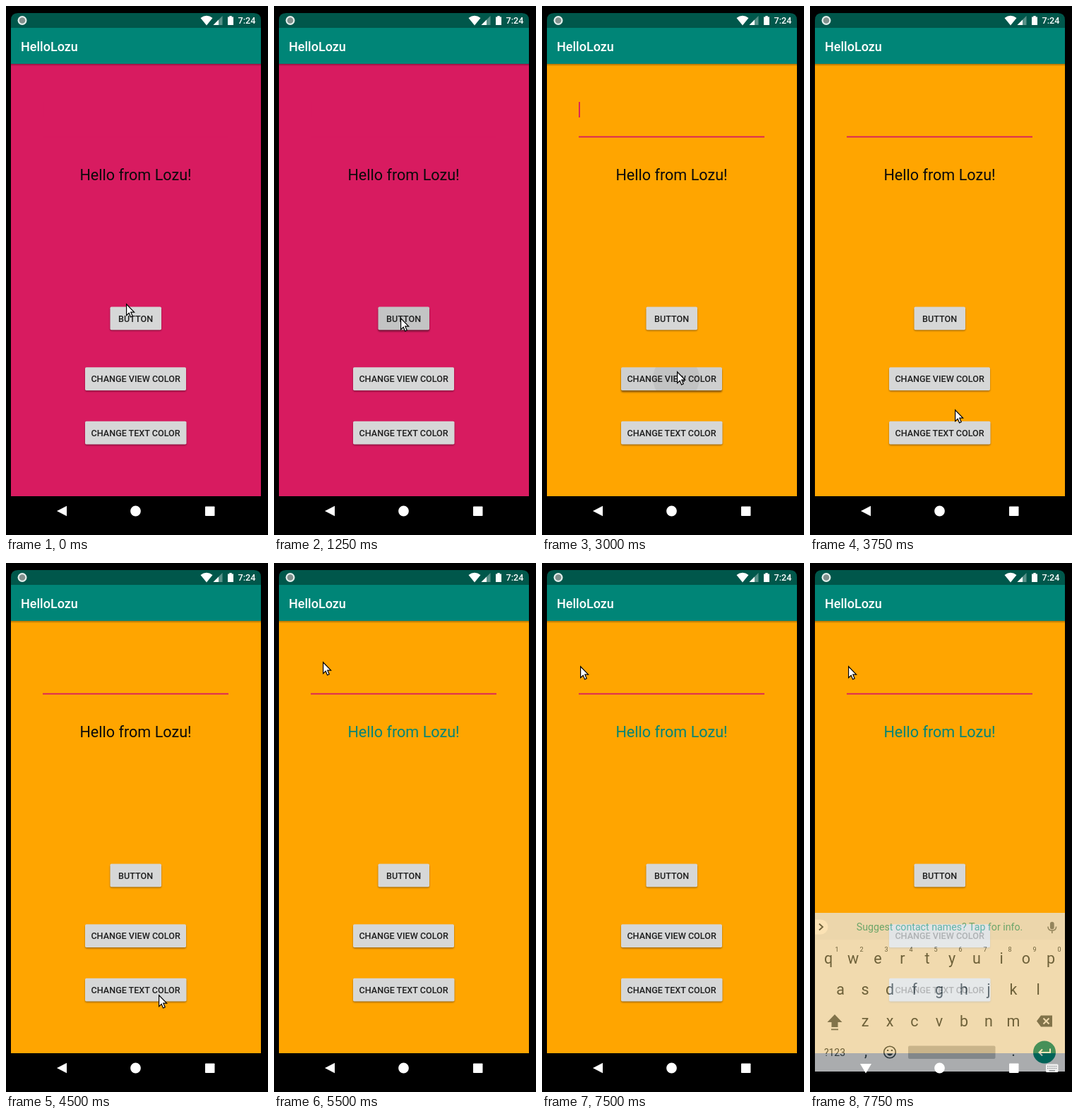
An HTML page for the animation above (8 s loop, 371 px wide and 750 px high).

```html
<!DOCTYPE html>
<html lang="en">
<head>
<meta charset="utf-8">
<title>Color buttons</title>
<style>
  html, body { margin: 0; width: 100%; height: 100%; overflow: hidden; background: #000; }
  svg { display: block; width: 100%; height: 100%; font-family: Roboto, sans-serif; }
  .mid { text-anchor: middle; }
  .label { font-size: 12.6px; font-weight: 500; fill: #1f1f1f; text-anchor: middle; }
  .key { font-size: 21.5px; text-anchor: middle; }
  .hint { font-size: 9px; text-anchor: middle; }
</style>
</head>
<body>
<svg viewBox="0 0 371 750">
  <defs>
    <linearGradient id="shade" x2="0" y2="1">
      <stop stop-opacity=".32"/><stop offset="1" stop-opacity="0"/>
    </linearGradient>
    <filter id="soft" x="-10%" y="-30%" width="120%" height="170%"><feGaussianBlur stdDeviation="1.1"/></filter>
  </defs>
  <rect width="371" height="750"/>

  <rect id="view" x="7" y="81" width="354" height="614"/>
  <path d="M7 32V20Q7 10 17 10H351Q361 10 361 20V32Z" fill="#00574b"/>
  <rect x="7" y="31" width="354" height="51" fill="#008577"/>
  <rect x="7" y="82" width="354" height="3.5" fill="url(#shade)"/>
  <text x="21" y="64" font-size="18" font-weight="500" fill="#fff">HelloLozu</text>

  <g fill="#fff">
    <circle cx="23" cy="20.5" r="6.5" fill="#e4eeec"/>
    <circle cx="23" cy="20.5" r="4.3" fill="#81908d"/>
    <path d="M275.5 17Q284 10.5 292.5 17L284 27.5Z"/>
    <path d="M306.5 14V27H293.5Z" opacity=".35"/>
    <path d="M301 19.5V27H293.5Z"/>
    <path d="M314 15.5H316.3V14H319.7V15.5H322V27H314Z"/>
    <text x="328.5" y="25" font-size="12.6" font-weight="500">7:24</text>
  </g>

  <rect x="52" y="184.6" width="263" height="1.8" fill="#d81b60"/>
  <rect id="caret" x="52" y="136" width="1.8" height="22" fill="#d81b60"/>
  <text id="hello" class="mid" x="183.5" y="246.5" font-size="21.6">Hello from Lozu!</text>
  <g id="buttons"></g>

  <g id="keyboard" opacity=".72" fill="#37474f">
    <rect x="7" y="496" width="354" height="225" fill="#eceff1"/>
    <rect x="7" y="496" width="354" height="38" fill="#e6eaed"/>
    <path d="M7 505.5H15A10.5 10.5 0 0 1 15 526.5H7Z" fill="#fafafa"/>
    <path d="M13 511.5L18 516L13 520.5" fill="none" stroke="#37474f" stroke-width="1.8"/>
    <text class="mid" x="183.5" y="521" font-size="14.2" fill="#35a692">Suggest contact names? Tap for info.</text>
    <g fill="none" stroke="#6c7a80" stroke-width="1.6">
      <rect x="340.7" y="509.5" width="4.2" height="9" rx="2.1" fill="#6c7a80"/>
      <path d="M337 515.5Q337 521 342.8 521T348.6 515.5M342.8 521V525"/>
    </g>
    <g id="keys"></g>
    <path d="M35 640L45.5 651H39.5V658H30.5V651H24.5ZM30 660.5H40V662.3H30Z" opacity=".85"/>
    <path d="M321 649.5L327 641.5H343V657.5H327Z" opacity=".85"/>
    <path d="M330.5 645.5L338.5 653.5M338.5 645.5L330.5 653.5" stroke="#eceff1" stroke-width="2"/>
    <text class="mid" x="35" y="698.5" font-size="14">?123</text>
    <g fill="none" stroke="#37474f" stroke-width="1.6">
      <circle cx="113" cy="693.5" r="8.3"/>
      <path d="M108.5 695.5Q113 702 117.5 695.5Z" fill="#37474f" stroke="none"/>
      <path d="M109 691H111.2M114.8 691H117" stroke-width="2.2"/>
    </g>
    <rect x="139" y="684.5" width="123.5" height="18.5" rx="2" fill="#b5bbbf"/>
    <circle cx="332" cy="693.5" r="16" fill="#00897b"/>
    <path d="M340 688.5V694H325M329 689.5L324.5 694L329 698.5" fill="none" stroke="#fff" stroke-width="2"/>
  </g>

  <g fill="#fff">
    <path id="back"/>
    <circle cx="183.5" cy="716" r="7.4"/>
    <rect x="282" y="709.5" width="13.5" height="13.5" rx=".8"/>
    <g id="switcher">
      <rect x="334" y="710.5" width="17.5" height="11.5" rx="1.5" fill="#f2f2f2"/>
      <path d="M336 713.5H350M336 716.5H350" stroke="#8f9396" stroke-width="1.6" stroke-dasharray="1.7 1.2"/>
      <path d="M338.5 719.7H347" stroke="#8f9396" stroke-width="1.5"/>
    </g>
  </g>
  <path id="pointer" d="M.6 .8V16.6L4.2 13.2L6.6 18.9L9.2 17.8L6.8 12.2H11.6Z" fill="#fff" stroke="#000" stroke-width="1.2"/>
</svg>
<script>
const LOOP = 8000, STEP = 250;
const $ = id => document.getElementById(id);
const NS = "http://www.w3.org/2000/svg";

function add(parent, tag, attrs, text = "") {
  const node = document.createElementNS(NS, tag);
  for (const name in attrs) node.setAttribute(name, attrs[name]);
  node.textContent = text;
  return parent.appendChild(node);
}

// press: time the finger goes down; hold: how long until the ripple is gone
const buttons = [
  { label: "BUTTON", x: 147.5, y: 426.5, w: 72.5, press: 1000, hold: 1000, at: [179, 442] },
  { label: "CHANGE VIEW COLOR", x: 112, y: 512.3, w: 143, press: 3000, hold: 750, at: [190, 528] },
  { label: "CHANGE TEXT COLOR", x: 112, y: 588.8, w: 143.5, press: 4750, hold: 500, at: [217, 612] }
];

buttons.forEach((b, i) => {
  const group = add($("buttons"), "g", {});
  const box = { x: b.x, y: b.y, width: b.w, height: 32.7, rx: 1.8 };
  add(add(group, "clipPath", { id: "clip" + i }), "rect", box);
  b.shadow = add(group, "rect", { ...box, filter: "url(#soft)" });
  add(group, "rect", { ...box, fill: "#d6d7d7" });
  b.tint = add(group, "rect", box);
  b.ripple = add(group, "circle", { cx: b.at[0], cy: b.at[1], "clip-path": `url(#clip${i})` });
  add(group, "text", { class: "label", x: 183.6, y: b.y + 21 }, b.label);
});

function keyRow(chars, x, y, hints = "") {
  [...chars].forEach((char, i) => {
    const cx = x + i * 35;
    add($("keys"), "text", { class: "key", x: cx, y }, char);
    if (hints) add($("keys"), "text", { class: "hint", x: cx + 12, y: y - 16.5 }, hints[i]);
  });
}
keyRow("qwertyuiop", 26, 567.5, "1234567890");
keyRow("asdfghjkl", 43, 612);
keyRow("zxcvbnm", 78, 657);
keyRow(",", 79, 699);
keyRow(".", 288, 699);

// [time, x, y] of the pointer tip
const pointerPath = [
  [0, 170, 422], [250, 177, 438], [500, 179, 442],
  [2250, 190, 513], [2500, 191, 518],
  [3750, 205, 572], [4000, 216, 612],
  [5250, 140, 380], [5500, 69, 140],
  [5750, 63, 144], [6000, 57, 146], [6250, 54, 146]
];

const show = (node, on) => node.setAttribute("visibility", on ? "visible" : "hidden");

function drawPress(b, t) {
  const age = (t - b.press) / b.hold;
  const active = age >= 0 && age < 1;
  const fade = active ? 1 - age * age : 0;
  b.tint.setAttribute("opacity", fade * 0.04);
  b.ripple.setAttribute("opacity", fade * 0.06);
  b.ripple.setAttribute("r", active ? 33 + age * 110 : 0);
  b.shadow.setAttribute("transform", `translate(0 ${active ? 2.4 : 1.4})`);
  b.shadow.setAttribute("opacity", active ? 0.45 : 0.36);
}

function draw(now) {
  const t = Math.floor((now % LOOP) / STEP) * STEP;
  const [, x, y] = pointerPath.filter(p => p[0] <= t).pop();
  const typing = t >= 7750;

  $("pointer").setAttribute("transform", `translate(${x} ${y})`);
  $("view").setAttribute("fill", t < 3000 ? "#d81b60" : "#ffa500");
  $("hello").setAttribute("fill", t < 4750 ? "#0a0a0a" : "#008577");
  show($("caret"), t % 1000 < 500);
  buttons.forEach(b => drawPress(b, t));
  show($("keyboard"), typing);
  show($("switcher"), typing);
  $("back").setAttribute("d", typing ? "M71 710H87L79 723.5Z" : "M72 716L86 708.8V723.2Z");
}

const start = performance.now();
function tick() {
  draw(performance.now() - start);
  requestAnimationFrame(tick);
}
tick();
</script>
</body>
</html>
```
